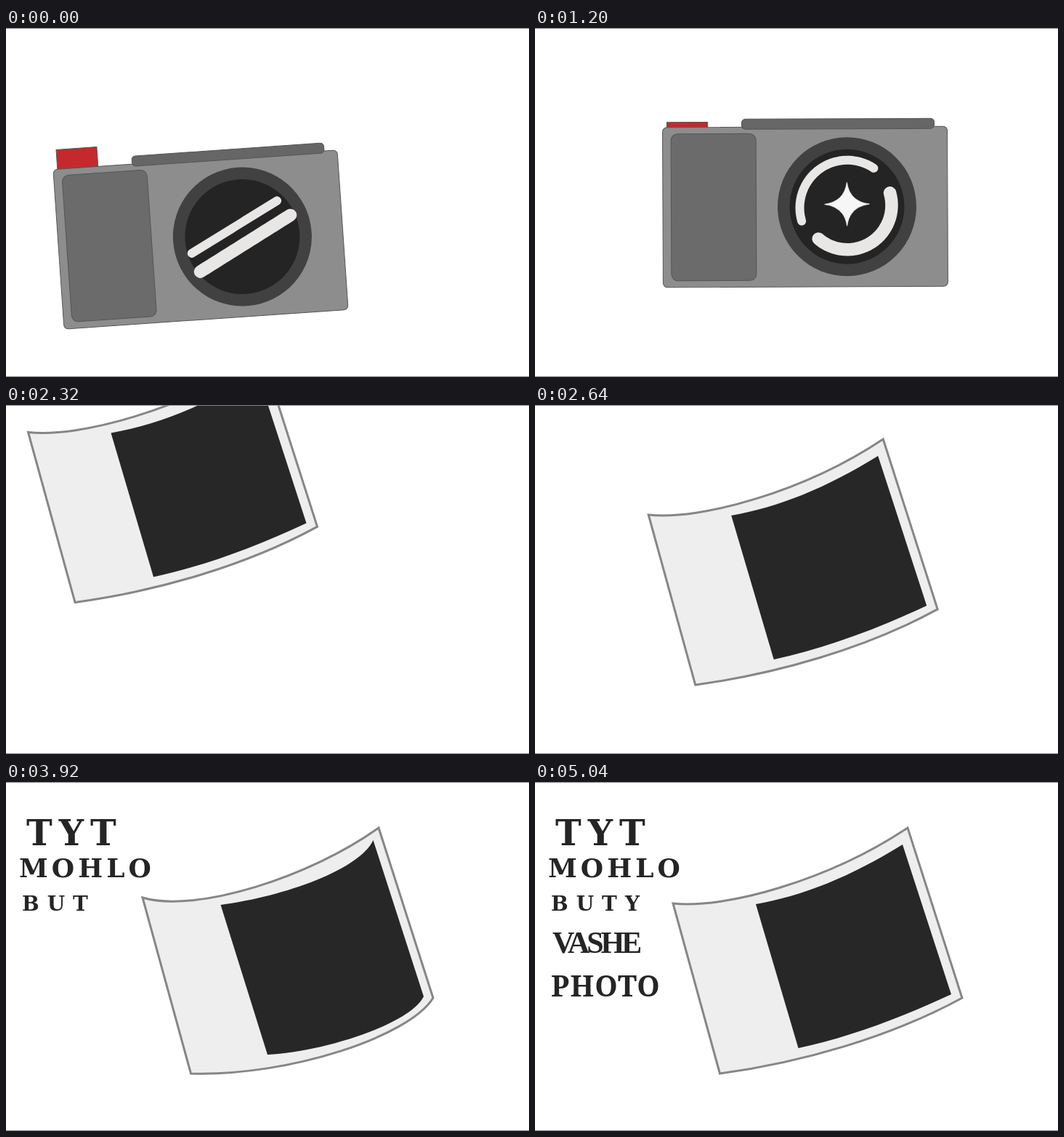
Write an HTML page that moves like this. It is 720x480 px and loops after 5120 ms.

```html
<!DOCTYPE html>
<html lang="en">
<head>
<meta charset="utf-8">
<title>Camera and photo</title>
<style>
  html, body { margin: 0; width: 100%; height: 100%; overflow: hidden; background: #fff; }
  svg { display: block; width: 720px; height: 480px; }
  text { fill: #252525; font: 700 40px "DejaVu Serif", serif; }
  .glint { fill: none; stroke: #e9e6e6; stroke-linecap: round; stroke-linejoin: round; }
  #tyt { font-size: 48px; letter-spacing: 9px; }
  #mohlo { font-size: 36px; letter-spacing: 5px; }
  #buty { font-size: 28px; letter-spacing: 11px; }
  #vashe { font-family: "Liberation Serif", serif; font-size: 42px; letter-spacing: -4px; }
  #photo-word { font-family: "Noto Serif", serif; font-weight: 900; letter-spacing: 1px; }
</style>
</head>
<body>
<svg viewBox="0 0 720 480">
  <g id="camera" stroke="#555">
    <rect id="button" x="-190" width="56" fill="#c5292b"/>
    <rect x="-196" y="-110" width="392" height="220" rx="6" fill="#8d8d8d"/>
    <rect x="-87" y="-121" width="265" height="14" rx="5" fill="#666"/>
    <rect x="-184.5" y="-101" width="117" height="202" rx="9" fill="#6b6b6b"/>
    <g transform="translate(57.5 0)">
      <circle r="95.5" fill="#414141" stroke="none"/>
      <circle r="79" fill="#242424" stroke="none"/>
      <path id="thin" class="glint" stroke-width="12"/>
      <path id="thick" class="glint" stroke-width="17.5"/>
      <path id="star" fill="#f6f6f6" stroke="#e9e6e6"/>
    </g>
  </g>
  <g id="photo">
    <path id="paper" fill="#eee" stroke="#868686" stroke-width="3"/>
    <path id="print" fill="#272727"/>
  </g>
  <text id="tyt" x="28" y="87" data-word="TYT"></text>
  <text id="mohlo" x="18" y="131" data-word="MOHLO"></text>
  <text id="buty" x="22" y="177" data-word="BUTY"></text>
  <text id="vashe" x="24" y="235" data-word="VASHE"></text>
  <text id="photo-word" x="22" y="295" data-word="PHOTO"></text>
  <path d="M0 .5H720M0 479.5H720" stroke="#888"/>
</svg>
<script>
const LOOP = 5120, STEP = 80;
const ARRIVE = 560, GLINT_END = 1200, FLASH_END = 1680;
const FALL = 1920, LAND = 2800, SWAY_START = 2880, SWAY = 1040, SWAY_END = 5040;
const TYPE_START = 3120, PAUSE_AFTER = 11;

const $ = id => document.getElementById(id);
const set = (id, name, value) => $(id).setAttribute(name, value);
const show = (id, visible) => set(id, "visibility", visible ? "visible" : "hidden");
const mix = (a, b, k) => Array.isArray(a) ? a.map((v, i) => mix(v, b[i], k)) : a + (b - a) * k;
const progress = (t, from, to) => Math.min(1, Math.max(0, (t - from) / (to - from)));

const SEGMENTS = 32;
const sample = fn => Array.from({ length: SEGMENTS + 1 }, (_, i) => fn(i / SEGMENTS));
const line = (a, b) => sample(k => mix(a, b, k));
const arc = (cx, cy, r, from, to) => sample(k => {
  const a = mix(from, to, k) * Math.PI / 180;
  return [cx + r * Math.cos(a), cy + r * Math.sin(a)];
});
const polyline = points => "M" + points.join("L");

// Each glint is a long line that shortens, then curls into an arc.
const glints = {
  thin: [line([-71, 18], [51, -46]), line([-22, -8], [2, -21]), arc(0.5, 1.5, 65.5, 164, 304)],
  thick: [line([-61, 44], [68, -25]), line([-24, 25], [32, -7]), arc(0.5, -2, 61, 131, -16)]
};

// Corner, two controls, corner for the top edge; then the same for the bottom edge.
const paper = {
  flat: [[190, 167], [262, 175], [405, 135], [513, 63], [588, 297], [489, 351], [366, 386], [254.5, 401]],
  bent: [[188, 159], [262, 181], [420, 130], [513, 63], [588, 297], [555, 350], [390, 405], [254.5, 401]]
};
const print = {
  flat: [[304, 168], [368, 157], [435, 130], [506, 86], [573, 292], [498, 327], [428, 352], [362.5, 366]],
  bent: [[295.5, 169], [385, 157], [487, 120], [505.5, 80], [575, 295], [555, 335], [430, 372], [360, 375]]
};
function sheet({ flat, bent }, k) {
  const [a, b, c, d, e, f, g, h] = mix(flat, bent, k);
  return `M${a}C${b} ${c} ${d}L${e}C${f} ${g} ${h}Z`;
}

function drawStar(t) {
  const grow = progress(t, 640, GLINT_END), burst = progress(t, GLINT_END, FLASH_END);
  const cy = mix(-3.5, -38, burst);
  const w = mix(31 * grow, 126, burst), h = mix(30 * grow, 158, burst);
  const side = (x, y) => `Q${x * w / 9} ${cy + y * h / 9} `;
  set("star", "d", `M0 ${cy - h}${side(1, -1)}${w} ${cy}${side(1, 1)}0 ${cy + h}` +
    `${side(-1, 1)}${-w} ${cy}${side(-1, -1)}0 ${cy - h}Z`);
  show("star", grow > 0);
}

function drawCamera(t) {
  const arrive = progress(t, 0, ARRIVE), curl = progress(t, ARRIVE, GLINT_END);
  const [x, y, angle] = mix([268, 291, -3.95], [372, 246, -0.25], arrive);
  set("camera", "transform", `translate(${x} ${y}) rotate(${angle})`);
  const height = 28 * (1 - arrive) + 8 * curl;
  set("button", "y", -109 - height);
  set("button", "height", height);
  for (const id in glints) {
    const [long, short, curved] = glints[id];
    set(id, "d", polyline(mix(mix(long, short, arrive), curved, curl)));
  }
  drawStar(t);
}

// The photo falls like a leaf, swinging less and less, then flexes in place.
function drawPhoto(t) {
  const fall = progress(t, FALL, LAND), left = 1 - fall;
  const dx = 329 * left * Math.sin(2 * Math.PI * Math.sqrt(fall));
  const dy = -410 * left ** 1.9;
  set("photo", "transform", `translate(${dx} ${dy})`);

  const flex = (1 + Math.cos(2 * Math.PI * (t - SWAY_START) / SWAY)) / 2;
  const bend = t < SWAY_START ? progress(t, 2640, LAND) : t < SWAY_END ? flex : 0;
  set("paper", "d", sheet(paper, bend));
  set("print", "d", sheet(print, bend));
}

function drawCaption(t) {
  let typed = Math.max(0, Math.floor((t - TYPE_START) / STEP) + 1);
  if (typed > PAUSE_AFTER) typed--;
  for (const node of document.querySelectorAll("text")) {
    const { word } = node.dataset;
    node.textContent = word.slice(0, Math.max(0, typed));
    typed -= word.length;
  }
}

function draw(t) {
  show("camera", t <= FLASH_END);
  if (t > FLASH_END) show("star", false);
  else drawCamera(t);
  show("photo", t > FALL);
  drawPhoto(t);
  drawCaption(t);
}

const begin = performance.now();
function tick() {
  const elapsed = (performance.now() - begin) % LOOP;
  draw(Math.floor(elapsed / STEP) * STEP);
  requestAnimationFrame(tick);
}
tick();
</script>
</body>
</html>
```
